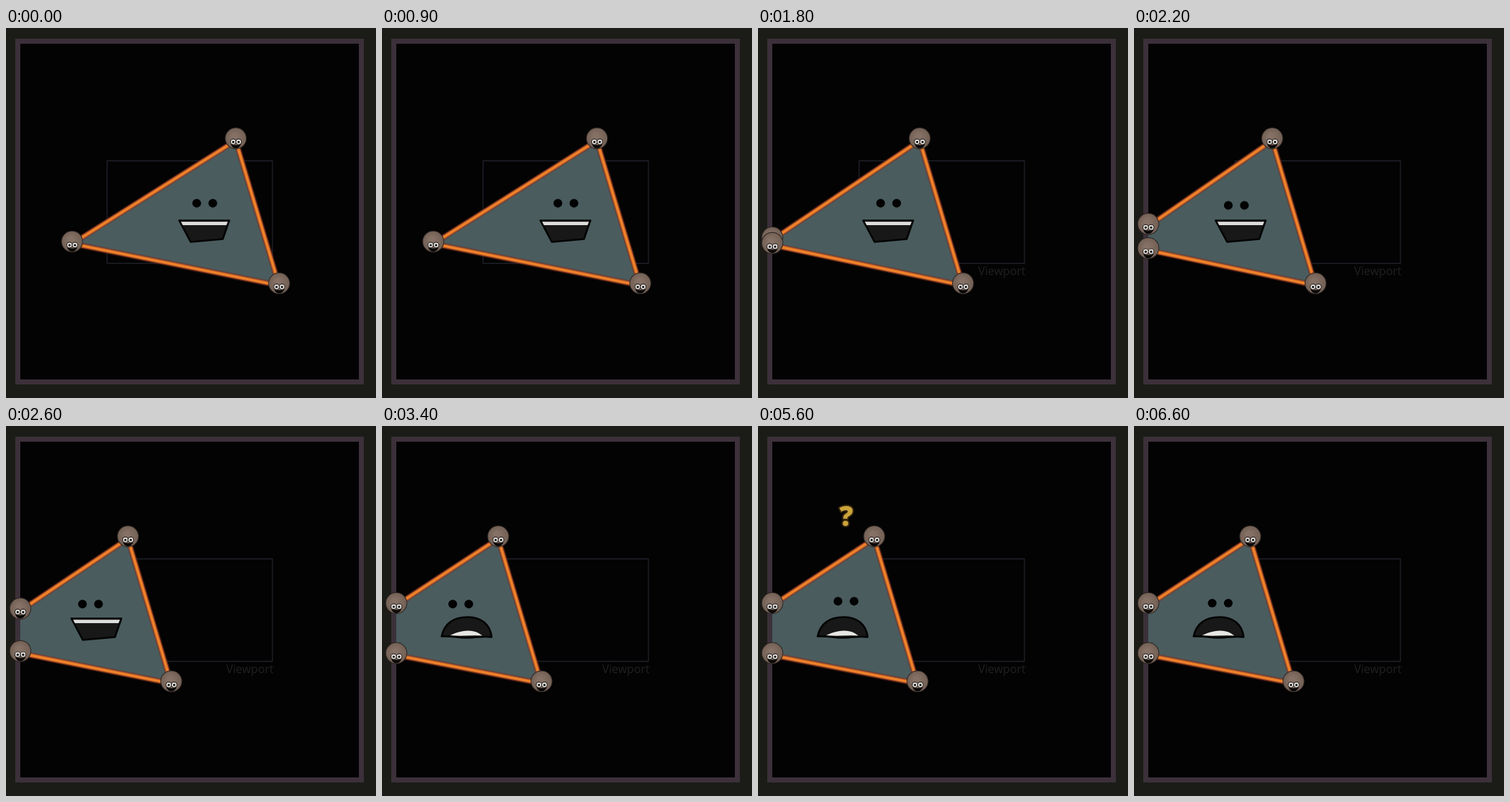
An HTML page with a canvas that plays this animation: 518x518 px, repeating every 6.7 s.

```html
<!DOCTYPE html>
<html lang="en">
<head>
<meta charset="utf-8">
<title>Triangle clipping</title>
<style>
  html, body { margin: 0; width: 100%; height: 100%; overflow: hidden; background: #1b1c17; }
  canvas { display: block; width: 518px; height: 518px; }
</style>
</head>
<body>
<canvas id="stage" width="518" height="518"></canvas>
<script>
const ctx = document.getElementById('stage').getContext('2d');
const LOOP = 6700, STEP = 100, WALL = 20, SINK = 3;

const clamp = v => Math.min(1, Math.max(0, v));
const span = (t, a, b) => clamp((t - a) / (b - a));
const sine = p => (1 - Math.cos(Math.PI * p)) / 2;
const mix = (a, b, p) => a + (b - a) * p;

function dot(x, y, r, color) {
  ctx.fillStyle = color;
  ctx.beginPath();
  ctx.arc(x, y, r, 0, Math.PI * 2);
  ctx.fill();
}

function trace(points) {
  ctx.beginPath();
  points.forEach(([x, y], i) => i ? ctx.lineTo(x, y) : ctx.moveTo(x, y));
}

function stroke(width, color) {
  ctx.lineWidth = width;
  ctx.strokeStyle = color;
  ctx.stroke();
}

function drawStage(t) {
  ctx.fillStyle = '#1b1c17';
  ctx.fillRect(0, 0, 518, 518);
  ctx.fillStyle = '#3c303a';
  ctx.fillRect(13, 15, 488, 484);
  ctx.fillStyle = '#030303';
  ctx.fillRect(20, 22, 474, 470);

  ctx.lineWidth = 1.4;
  ctx.strokeStyle = '#1f2129';
  ctx.strokeRect(141.5, 186, 231.5, 143.5);

  ctx.globalAlpha = span(t, 900, 1700);
  ctx.font = '16px "Open Sans", "Noto Sans", sans-serif';
  ctx.textAlign = 'right';
  ctx.fillStyle = '#202022';
  ctx.fillText('Viewport', 374.5, 346);
  ctx.globalAlpha = 1;
}

function drawBall([x, y]) {
  dot(x, y, 15.3, '#2b2422');
  const skin = ctx.createRadialGradient(x - 2, y - 3, 3, x, y, 15);
  skin.addColorStop(0, '#857165');
  skin.addColorStop(1, '#725f54');
  dot(x, y, 14.3, skin);

  // grin
  ctx.beginPath();
  ctx.moveTo(x - 7, y + 8);
  ctx.quadraticCurveTo(x, y + 11, x + 7.5, y + 8);
  ctx.quadraticCurveTo(x + 5, y + 14, x, y + 14);
  ctx.quadraticCurveTo(x - 5, y + 14, x - 7, y + 8);
  ctx.fillStyle = '#0a0908';
  ctx.fill();

  for (const dx of [-3.6, 4]) {
    dot(x + dx, y + 4.8, 4.3, '#191514');
    dot(x + dx, y + 4.8, 3.4, '#e4e0dc');
    dot(x + dx, y + 5, 1.6, '#0b0b0b');
  }
}

function drawSmile() {
  trace([[-35, -15], [35, -15], [26, 11], [-19, 15]]);
  ctx.closePath();
  ctx.fillStyle = '#171817';
  ctx.fill();
  stroke(2.6, '#030303');
  trace([[-32.5, -13.2], [33, -13.2], [31, -8.5], [-30, -8.5]]);
  ctx.fillStyle = '#dedede';
  ctx.fill();
}

function drawFrown() {
  const shape = new Path2D('M-35 10 C-31 -9 -17 -17 2 -17 C20 -17 33 -7 35 11 C22 9 15 12 0 12 C-14 12 -22 9 -35 10 Z');
  ctx.fillStyle = '#171817';
  ctx.fill(shape);
  ctx.lineWidth = 2.6;
  ctx.strokeStyle = '#030303';
  ctx.stroke(shape);
  ctx.fillStyle = '#e6e6e2';
  ctx.fill(new Path2D('M-23 8.5 Q-10 2 2 2 Q14 2 22 9 Q12 8.5 0 9 Q-14 9.5 -23 8.5 Z'));
}

function drawFace(t, shift) {
  const down = sine(span(t, 1800, 2400));
  const up = sine(span(t, 4100, 4700));
  const rest = sine(span(t, 6000, 6500));
  const ex = mix(mix(-9 * down, 4, up), 1.5, rest);
  const ey = mix(mix(4 * down, 0, up), 2.7, rest);
  for (const x of [267, 289.5]) dot(x + shift + ex, 245.3 + ey, 6.1, '#020202');

  const turn = Math.cos(Math.PI * span(t, 2850, 3200));
  ctx.save();
  ctx.translate(277.5 + shift, 284.5);
  ctx.scale(1, Math.max(0.1, Math.abs(turn)));
  ctx.lineJoin = 'round';
  turn > 0 ? drawSmile() : drawFrown();
  ctx.restore();
}

function drawQuestion(t) {
  const alpha = span(t, 4600, 4850) * (1 - span(t, 5700, 6400));
  if (!alpha) return;
  const rise = Math.sin(span(t, 4700, 6200) * Math.PI / 2);
  ctx.save();
  ctx.globalAlpha = alpha;
  ctx.translate(mix(115, 123, rise), mix(191, 128, rise));
  ctx.font = '800 38px "Open Sans", "Noto Sans", sans-serif';
  ctx.textAlign = 'center';
  ctx.lineJoin = 'round';
  ctx.lineWidth = 4;
  ctx.strokeStyle = '#33240c';
  ctx.strokeText('?', 2, 0);
  ctx.fillStyle = '#cba43c';
  ctx.fillText('?', 2, 0);
  ctx.restore();
}

function draw(t) {
  const shift = -159 * sine(span(t, 255, 2995));
  const top = [321.7 + shift, 154.5];
  const low = [382.4 + shift, 357.5];
  const tip = 92.5 + shift;

  // past the wall the tip splits into two corners
  const cut = Math.pow(clamp((WALL - tip) / 86.5), 1.65);
  const left = Math.max(WALL, tip);
  const upper = [left, 299 - 51 * cut];
  const lower = [left, 299 + 19 * cut];

  // the body hangs slightly below the ball centres
  const outline = [upper, top, low, lower].map(([x, y]) => [x, y + SINK]);

  drawStage(t);
  trace(outline);
  ctx.fillStyle = '#4a5c5e';
  ctx.fill();

  ctx.lineJoin = 'round';
  trace(outline);
  stroke(8.5, 'rgba(115, 45, 30, 0.5)');
  stroke(5.8, '#b4522a');
  stroke(3.2, '#ee8429');

  drawQuestion(t);
  [top, low, upper].forEach(drawBall);
  if (cut > 0) drawBall(lower);
  drawFace(t, shift);
}

const start = performance.now();
function tick() {
  const t = (performance.now() - start) % LOOP;
  draw(Math.floor(t / STEP) * STEP);
  requestAnimationFrame(tick);
}
tick();
</script>
</body>
</html>
```
